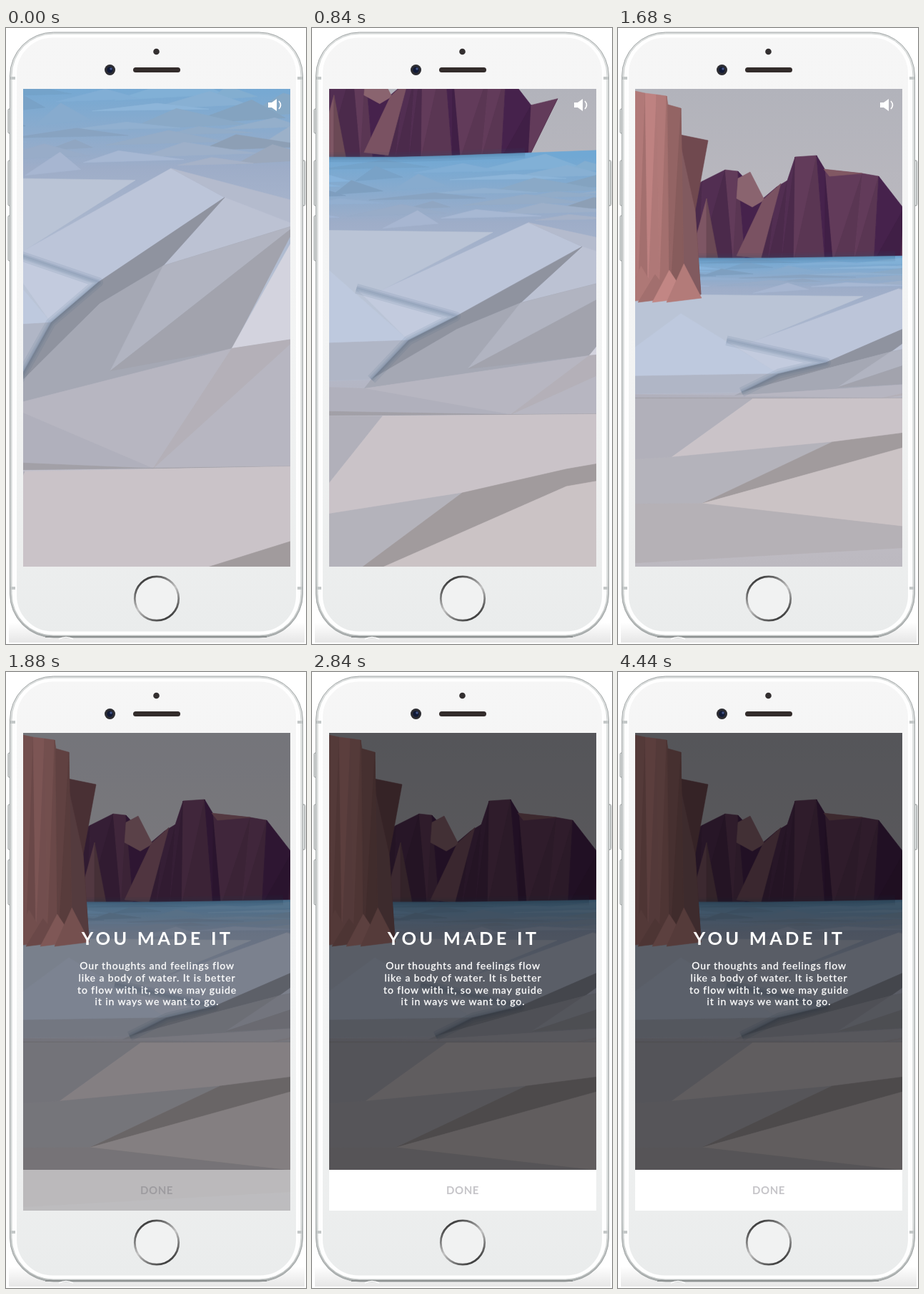
Write an HTML page with a canvas that moves like this. It is 420 px wide and 860 px high and loops after 4480 ms.

```html
<!DOCTYPE html>
<html lang="en">
<head>
<meta charset="utf-8">
<title>Low-poly valley</title>
<style>
html, body { margin: 0; width: 100%; height: 100%; overflow: hidden; background: #fff; }
#stage { position: relative; width: 420px; height: 860px; overflow: hidden; }
svg, canvas { position: absolute; left: 0; top: 0; display: block; }
#screen { position: absolute; left: 24px; top: 85px; width: 374px; height: 667px; overflow: hidden; }
#dim { position: absolute; inset: 0; background: #000; }
#bar { position: absolute; left: 0; top: 610px; width: 374px; height: 57px; background: #fff; }
#copy { fill: #fff; text-anchor: middle; font-family: Lato, "Open Sans", sans-serif; }
#copy g { font-size: 14px; letter-spacing: .9px; stroke: #fff; stroke-width: .3px; }
#copy .title { font-size: 25.5px; font-weight: 700; letter-spacing: 4.2px; }
#bar text { fill: #c6c5c9; font: 700 15px Lato, sans-serif; letter-spacing: .6px; text-anchor: middle; }
</style>
</head>
<body>
<div id="stage">
  <svg width="420" height="860" viewBox="0 0 420 860">
    <defs>
      <linearGradient id="metal" x2="0" y2="1">
        <stop offset="0" stop-color="#e2e4e4"/><stop offset=".9" stop-color="#d6d9d9"/>
        <stop offset="1" stop-color="#a9adad"/>
      </linearGradient>
      <linearGradient id="face" x2="0" y2="1">
        <stop offset="0" stop-color="#f6f6f6"/><stop offset=".5" stop-color="#f3f4f4"/>
        <stop offset="1" stop-color="#eaecec"/>
      </linearGradient>
      <linearGradient id="ring" x1=".2" x2=".8" y2="1">
        <stop offset="0" stop-color="#2c2c2c"/><stop offset=".5" stop-color="#c4c4c4"/>
        <stop offset="1" stop-color="#2c2c2c"/>
      </linearGradient>
      <linearGradient id="floor" x2="0" y2="1">
        <stop offset="0" stop-color="#fff"/><stop offset="1" stop-color="#e6e6e6"/>
      </linearGradient>
    </defs>
    <rect x="4" y="830" width="414" height="28" fill="url(#floor)"/>
    <g fill="#dfe2e2" stroke="#8f9494">
      <rect x="3" y="113" width="6" height="34" rx="1.5"/>
      <rect x="3" y="185" width="6" height="63" rx="1.5"/>
      <rect x="3" y="262" width="6" height="63" rx="1.5"/>
      <rect x="412" y="185" width="6.5" height="63" rx="1.5"/>
    </g>
    <rect x="5.5" y="6" width="410" height="845" rx="61" fill="url(#metal)" stroke="#a0a5a5"/>
    <rect x="8" y="8" width="405" height="840" rx="58" fill="#fdfdfd" stroke="#cdd1d0"/>
    <rect x="13.5" y="12" width="394" height="832" rx="52" fill="url(#face)" stroke="#fff" stroke-width="3"/>
    <path d="M6 70h7M408 70h7M6 782h7M408 782h7" stroke="#c4c8c8" stroke-width="4"/>
    <path d="M55 850H365" stroke="#8e9292" stroke-width="2"/>
    <path d="M74 853q10-5 20 0" fill="none" stroke="#fff" stroke-width="1.5"/>
    <circle cx="210.5" cy="33" r="4.3" fill="#332f30"/>
    <rect x="178" y="55" width="66" height="7" rx="3.5" fill="#332c2b"/>
    <circle cx="145.5" cy="58.5" r="7.5" fill="#2d2d32"/>
    <circle cx="145.5" cy="58.5" r="4.2" fill="#111a37"/>
    <circle cx="147" cy="57" r="1.7" fill="#465689"/>
    <circle cx="211" cy="796.5" r="30.7" fill="#f1f2f2" stroke="url(#ring)" stroke-width="2.8"/>
  </svg>
  <div id="screen">
    <canvas id="scene" width="374" height="667"></canvas>
    <div id="dim"></div>
    <svg id="sound" width="374" height="40" fill="#fff">
      <path d="M343 19h5l7-5v17l-7-5h-5z"/>
      <path d="M358 17q5 5.500 0 11" fill="none" stroke="#fff" stroke-width="1.5"/>
    </svg>
    <svg id="copy" width="374" height="667" viewBox="24 85 374 667">
      <text class="title" x="212" y="381">YOU MADE IT</text>
      <g>
        <text x="211.5" y="415">Our thoughts and feelings flow</text>
        <text x="211.5" y="431.5">like a body of water. It is better</text>
        <text x="211.5" y="448.5">to flow with it, so we may guide</text>
        <text x="211.5" y="465">it in ways we want to go.</text>
      </g>
    </svg>
    <div id="bar"><svg width="374" height="57"><text x="187" y="34">DONE</text></svg></div>
  </div>
</div>
<script>
const LOOP = 4480, STEP = 560, REVEAL = 1720;
const $ = id => document.getElementById(id);
const ctx = $('scene').getContext('2d');

const points = text => text.split(' ').map(p => p.split(',').map(Number));
const mix = (a, b, f) => a + (b - a) * f;
const rgb = (color, tone = 1) => `rgb(${color.map(c => Math.round(Math.min(255, c * tone)))})`;

function seeded(seed) {
  return () => (seed = seed * 16807 % 2147483647) / 2147483647;
}

// Heights of ground levels, seen from four camera poses.
const levels = [
  [70, 196, 355, 520, 618, 850, 1230],
  [112, 228, 373, 505, 569, 740, 1000],
  [247, 317, 434, 499, 519, 612, 850],
  [320, 364, 467, 513, 517, 590, 750]
];
const base = levels[1];

// Blue light by the shore turns to warm grey up close.
const lights = ['70a8d4', '9eadc8', 'b6c0d3', 'b4b6c4', 'c3c1cb', 'c4c2ca', 'bcb9c0']
  .map(hex => hex.match(/../g).map(c => parseInt(c, 16)));

function locate(y) {
  let k = 0;
  while (k < base.length - 2 && y > base[k + 1]) k++;
  return [k, (y - base[k]) / (base[k + 1] - base[k])];
}

function light(x, y) {
  const [k, f] = locate(Math.max(base[0], y));
  const warm = x / 50;
  return lights[k].map((c, i) => mix(c, lights[k + 1][i], f) + warm * (1 - i));
}

function iceFacet(pts, tone) {
  const mean = i => pts.reduce((sum, p) => sum + p[i], 0) / pts.length;
  return { pts, fill: rgb(light(mean(0), mean(1)), tone) };
}

// Named corners of the ice, joined into facets with a relative brightness.
const corners = {};
for (const item of (
  'A265,228 B340,265 C163,373 P97,418 Q45,492 R254,352 S165,397 L215,243 K55,335 J-40,277 M24,330 ' +
  'N180,472 V350,447 D35,510 G240,567 E60,570 W172,712 X-54,755 T-10,860 U318,668 Y318,700 H270,912 ' +
  'a440,270 b440,300 c436,318 d440,436 e440,565 f440,640 g440,672 h440,945 ' +
  'k-160,238 l-160,430 m-160,500 i-160,556 n-160,570 o-160,765 p-160,862 q-160,1000').split(' ')) {
  corners[item[0]] = item.slice(1).split(',').map(Number);
}
const corner = name => corners[name];

const ice = ('kLKCPQm:1.02 JPl:1.05 MCP:1.06 lPQm:.98 AKCB:1.08 AabB:1.05 BbR:1.06 BCPQSR:.77 ' +
  'QSRbVD:.89 RbN:.94 bVN:.86 cVd:1.11 mDVden:1 VGd:.96 mDGn:.94 iGen:.83 EefUWX:1.01 nEXo:.91 ' +
  'oXWTp:.93 WUfgYT:.8 TYghH:1.02 pTHhq:.94').split(' ').map(item => {
  const [names, tone] = item.split(':');
  return iceFacet([...names].map(corner), +tone);
});

// Shallow shards between the shore and the first ridge.
function makeShards() {
  const rand = seeded(41), shards = [];
  for (let i = 0; i < 34; i++) {
    const x = mix(-160, 400, i * .618 % 1), y = mix(122, 222, i / 33);
    const w = mix(60, 170, rand()), h = mix(8, 26, rand()), peak = mix(.3, .7, rand());
    shards.push(iceFacet([[x, y + h * .6], [x + w * peak, y - h * .6], [x + w, y + h * .3]], mix(.92, 1.07, rand())));
  }
  return shards;
}

// A wall of faces hanging from a ridge line; steep faces are darker.
function makeWall(ridge, foot, color) {
  return ridge.slice(1).flatMap((b, i) => {
    const a = ridge[i], fill = color(a, b, i);
    return [
      { pts: [a, b, foot(b), foot(a)], fill: rgb(fill) },
      { pts: [b, foot(b), foot(a)], fill: rgb(fill, .92) }
    ];
  });
}

function makePeaks() {
  const ridge = points('96,228 118,214 150,198 168,200 203,238 222,222 237,213 248,180 278,178 290,198 342,203 365,207 400,252 437,243');
  const foot = ([x]) => [Math.min(396, x + 12 * Math.sin(x / 20)), 326];
  const color = (a, b) => {
    const steep = (b[1] - a[1]) / (b[0] - a[0]);
    return Math.abs(steep) < .4 ? [98, 59, 90] : steep < 0 ? [82, 46, 82] : [70, 34, 76];
  };
  const spike = (x, y, w, shade) => [
    { pts: [[x, y], [x - w, 326], [x, 326]], fill: rgb(shade) },
    { pts: [[x, y], [x, 326], [x + w * .7, 326]], fill: rgb(shade, .85) }
  ];
  return [
    ...makeWall(ridge, foot, color),
    { pts: points('168,210 185,201 205,240 188,250 166,238'), fill: '#8a646f' },
    { pts: points('228,217 203,240 166,318 200,322'), fill: '#7a5262' },
    { pts: points('288,197 342,203 296,207'), fill: '#815863' },
    ...spike(124, 238, 24, [126, 86, 100]),
    ...spike(530, 268, 36, [74, 40, 80])
  ];
}

function makeRocks() {
  const rand = seeded(7), lumps = [];
  const ridge = points('-60,80 24,88 38,91 54,93 68,95 70,107 88,112');
  const columns = makeWall(ridge, ([x]) => [x + 4, 378 - x * .2],
    (a, b, i) => [190, 130, 129].map(c => c * (i % 2 ? .93 : 1) * (a[0] > 60 ? .83 : 1)));
  for (let x = -60; x < 100; x += 20) {
    const w = mix(18, 26, rand());
    lumps.push({
      pts: [[x - 12, 383], [x + w / 2, mix(326, 352, rand())], [Math.min(117, x + w + 14), 377]],
      fill: rgb([186, 128, 126], mix(.86, 1.06, rand()))
    });
  }
  return [
    { pts: points('82,148 126,157 108,255 116,372 80,372'), fill: '#70494f' },
    { pts: points('88,165 108,255 116,372 84,372'), fill: '#815a5f' },
    ...columns, ...lumps
  ];
}

const shards = makeShards(), peaks = makePeaks(), rocks = makeRocks();
const shore = [];
for (let x = -160; x <= 440; x += 60) shore.push([x, 115 - Math.max(0, x - 100) * .045]);
const land = [...shore, [440, 1100], [-160, 1100]];

// Smooth curve through four poses, at rest at both ends.
function pose(v, t) {
  const u = Math.min(2.9999, t / STEP), i = Math.floor(u), f = u - i;
  const slope = k => k === 0 || k === 3 ? 0 : (v[k + 1] - v[k - 1]) / 2;
  const f2 = f * f, f3 = f2 * f;
  return v[i] * (2 * f3 - 3 * f2 + 1) + slope(i) * (f3 - 2 * f2 + f)
    + v[i + 1] * (3 * f2 - 2 * f3) + slope(i + 1) * (f3 - f2);
}

const shiftMap = (dx, dy) => ([x, y]) => [x + dx, y + dy];

function trace(pts, map) {
  ctx.beginPath();
  for (const p of pts) ctx.lineTo(...map(p));
}

function paint(facets, map) {
  ctx.lineWidth = .6;
  for (const { fill, pts } of facets) {
    trace(pts, map);
    ctx.closePath();
    ctx.fillStyle = ctx.strokeStyle = fill;
    ctx.fill();
    ctx.stroke();
  }
}

function shadow(pts, map) {
  ctx.strokeStyle = 'rgba(50,75,110,.09)';
  for (const width of [14, 8, 4]) {
    trace(pts, map);
    ctx.lineWidth = width;
    ctx.stroke();
  }
}

function verticalGradient(ys, colors) {
  const first = ys[0], last = ys[ys.length - 1];
  const fill = ctx.createLinearGradient(0, first, 0, last);
  ys.forEach((y, i) => fill.addColorStop((y - first) / (last - first), colors[i]));
  return fill;
}

function drawScene(t) {
  ctx.setTransform(1, 0, 0, 1, -24, -85);
  ctx.lineJoin = 'round';
  ctx.fillStyle = verticalGradient([85, 330], ['#b2b3bb', '#bdbac0']);
  ctx.fillRect(24, 85, 374, 667);

  const ys = base.map((_, k) => pose(levels.map(row => row[k]), t));
  const dx = pose([-34, 0, 78, 128], t);
  const ground = ([x, y]) => {
    const [k, f] = locate(y);
    return [x + dx, mix(ys[k], ys[k + 1], f)];
  };

  paint(peaks, shiftMap(pose([-162, -128, -56, 0], t), pose([-252, -208, -77, 0], t)));
  paint([{ fill: verticalGradient(ys, lights.map(c => rgb(c))), pts: land }], ground);
  paint(shards, ground);
  shadow(shore.slice(0, 8), ground);
  paint(ice, ground);
  shadow([...'MCPQ'].map(corner), ground);
  paint(rocks, shiftMap(pose([-215, -170, -57, 0], t), pose([-230, -190, -60, 0], t)));
}

const ramp = (t, from, to) => Math.min(1, Math.max(0, (t - from) / (to - from)));

const start = performance.now();
function tick() {
  const t = (performance.now() - start) % LOOP;
  drawScene(t);
  $('dim').style.opacity = .52 * ramp(t, REVEAL, 1960);
  $('copy').style.opacity = ramp(t, REVEAL, 1840);
  $('bar').style.opacity = ramp(t, REVEAL, 2040);
  $('sound').style.opacity = t < REVEAL ? 1 : 0;
  requestAnimationFrame(tick);
}
tick();
</script>
</body>
</html>
```
